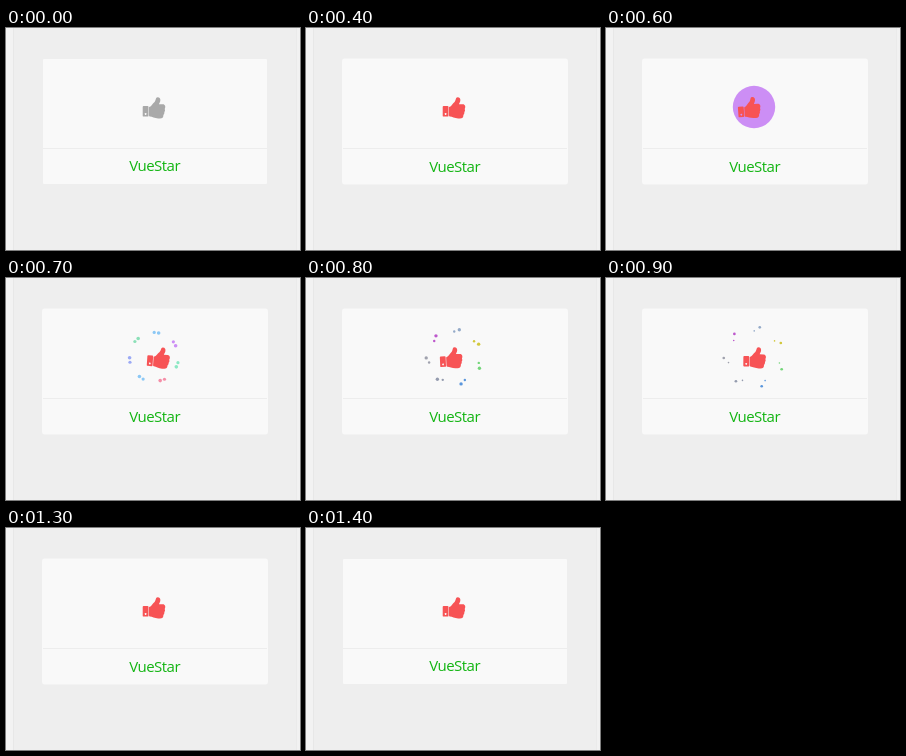
Write an HTML page with a canvas that moves like this. It is 294 px wide and 222 px high and loops after 1800 ms.

```html
<!DOCTYPE html>
<html lang="en">
<head>
<meta charset="utf-8">
<title>VueStar</title>
<style>
  html, body { margin: 0; width: 100%; height: 100%; overflow: hidden; background: #eee; }
  canvas { display: block; width: 294px; height: 222px; }
</style>
</head>
<body>
<canvas id="stage"></canvas>
<script>
const W = 294, H = 222, LOOP = 1800, STEP = 100;
const CENTER = { x: 148, y: 79 };
const DISC_AT = 500, BURST_AT = 700, BURST_LENGTH = 400;
const canvas = document.getElementById('stage');
const ctx = canvas.getContext('2d');
const dpr = window.devicePixelRatio || 1;
canvas.width = W * dpr;
canvas.height = H * dpr;

const earlyColors = ['#8cc8f5', '#cc8ef5', '#8ce8c3', '#f58ea7', '#8cc8f5', '#9caaf5', '#8ce0b8'];
const lateColors = ['#94aac8', '#d2c83c', '#74d67a', '#5a96dc', '#959caf', '#a0a2ae', '#bd58cc'];

const radians = degrees => degrees * Math.PI / 180;
const ease = p => p * p * (3 - 2 * p);

function rect(color, x, y, w, h, radius = 0) {
  ctx.fillStyle = color;
  ctx.beginPath();
  ctx.roundRect(x, y, w, h, radius);
  ctx.fill();
}

function disc(color, x, y, r) {
  ctx.fillStyle = color;
  ctx.beginPath();
  ctx.arc(x, y, r, 0, 2 * Math.PI);
  ctx.fill();
}

// Hand and cuff outlined around the origin, 22 by 21 pixels.
const thumb = new Path2D(`
  M-5.3 -.9 H0 Z
  M-10.4 -1.8 h4 q.9 0 .9 .9 v8.8 q0 .9 -.9 .9 h-4 q-.9 0 -.9 -.9 v-8.8 q0 -.9 .9 -.9 Z
  M-8.4 5.3 a.9 .9 0 1 0 .01 0 Z
  M-4.4 -1 C-2.6 -1.5 -1.4 -4.3 .6 -5.9 C2 -7.2 1.6 -10.5 3.5 -10.5
  C5.8 -10.5 6.6 -9 6.3 -7 C6 -5.2 5.2 -4.4 5 -3.5 H8.8
  C11 -3.5 12 -1 10.7 1.1 C11.3 2.4 11 3.4 10.3 4.2 C10.6 5.3 10.2 6.4 9.4 7.1
  C9.6 9.6 8.3 10.6 5.9 10.6 H4.2 C.6 10.6 -1.9 9 -4.1 8.8 Q-5 8.6 -5 7.8 V-.2 Q-5 -.8 -4.4 -1 Z`);

function drawCard(active) {
  rect('#eee', 0, 0, W, H);
  rect('#f2f2f2', 0, 0, 7, H);
  rect('#e7e7e7', 7, 0, 1, H);
  rect('#eaeaea', 290, 0, 1, H);
  rect('#f1f1f1', 291, 0, 3, H);
  if (active) rect('#f9f9f9', 36, 30.5, 226, 126, 3);
  else rect('#f9f9f9', 37, 31, 224, 125, 1);
  rect('#ededed', 37, 120, 224, 1);
  ctx.fillStyle = '#12b512';
  ctx.font = '500 15px "Open Sans", "Noto Sans", sans-serif';
  ctx.letterSpacing = '-0.5px';
  ctx.textAlign = 'center';
  ctx.fillText('VueStar', CENTER.x + 0.6, active ? 144 : 143);
}

function drawRing(colors, angle, distance, size) {
  colors.forEach((color, i) => {
    const a = radians(angle + i * 360 / colors.length);
    disc(color, CENTER.x + distance * Math.sin(a), CENTER.y - distance * Math.cos(a), size);
  });
}

// A disc swells, then breaks into two rings of dots that fly out and shrink.
function drawBurst(t) {
  const p = (t - BURST_AT) / BURST_LENGTH;
  if (t < DISC_AT || p >= 1) return;
  if (p < 0) {
    const swell = (t - DISC_AT) / STEP;
    disc(swell < 1 ? '#dd4688' : '#cc8ef5', CENTER.x, CENTER.y, 9 + 12.2 * swell);
    return;
  }
  const colors = p < 0.25 ? earlyColors : lateColors;
  const flight = 1 - (1 - p) ** 2;
  drawRing(colors, 11, 24.4 + 7.8 * flight, 1.8 * (1 - p * p));
  drawRing(colors, 0.5, 24.6 + 2 * flight, 1.6 * (1 - p));
}

// Swings to alternating sides every 150 ms, each swing smaller than the last.
function wobble(t) {
  const swing = k => k > 0 && k < 6 ? (-1) ** k * (6 - k) : 0;
  const phase = Math.max(0, t) / 150, k = Math.floor(phase);
  return swing(k) + (swing(k + 1) - swing(k)) * ease(phase - k);
}

function drawThumb(t) {
  const lean = wobble((t - 455) * 1.23);
  ctx.save();
  ctx.translate(CENTER.x + 1.15 * lean, 79.8);
  ctx.rotate(radians(lean));
  ctx.fillStyle = t < 400 ? '#a9a9a9' : '#f75355';
  ctx.fill(thumb, 'evenodd');
  ctx.restore();
}

function frame() {
  const t = Math.floor(performance.now() % LOOP / STEP) * STEP;
  ctx.setTransform(dpr, 0, 0, dpr, 0, 0);
  drawCard(t >= 400 && t < 1400);
  drawBurst(t);
  drawThumb(t);
  requestAnimationFrame(frame);
}
frame();
</script>
</body>
</html>
```
